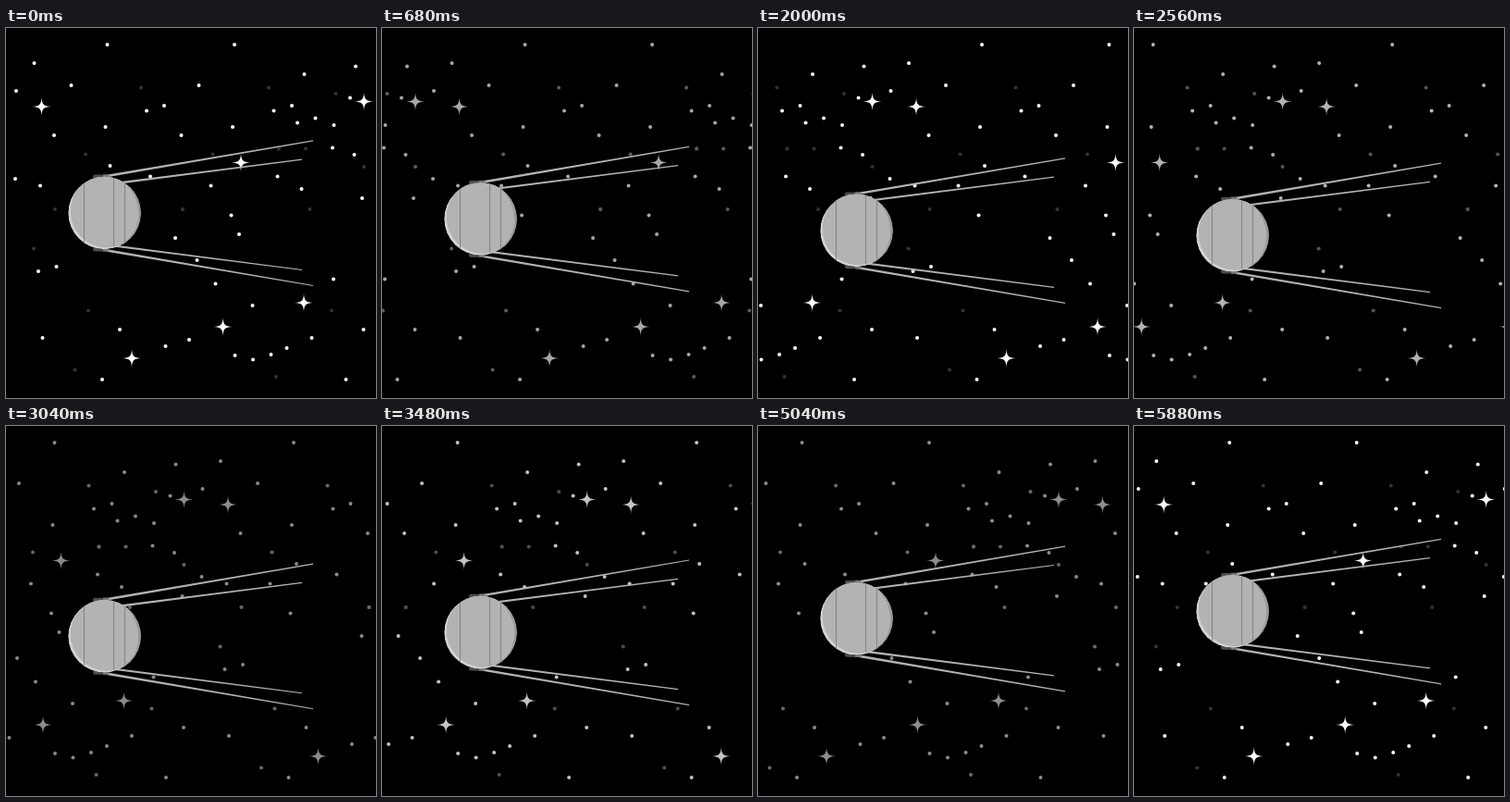
An HTML page for the animation above (5920 ms loop, 400 by 400 pixels).

```html
<!DOCTYPE html>
<html lang="en">
<head>
<meta charset="utf-8">
<title>Satellite</title>
<style>
html, body { margin: 0; width: 100%; height: 100%; overflow: hidden; background: #000; }
svg { display: block; width: 100%; height: 100%; }
</style>
</head>
<body>
<svg viewBox="0 0 400 400">
  <defs>
    <clipPath id="ball"><circle cx="106.5" cy="200" r="39.3"/></clipPath>
    <g id="tile"><g id="bright" fill="#fff"></g><g id="dim" fill="#fff"></g></g>
  </defs>
  <rect width="400" height="400"/>
  <g id="sky">
    <use href="#tile" x="-396"/>
    <use href="#tile"/>
    <use href="#tile" x="396"/>
  </g>
  <g id="craft">
    <g fill="#b3b3b3">
      <path d="M104 159.6L332 121.3V122.5L104 162.2Z"/>
      <path d="M116 167.1L320 141.6V142.8L116 169.4Z"/>
      <path d="M112 233.8L320 260.9V262.1L112 236.1Z"/>
      <path d="M104 238.3L332 277.9V279.1L104 240.9Z"/>
    </g>
    <g fill="#4d4d4d">
      <rect x="94" y="158.6" width="17" height="5" rx="2"/>
      <rect x="94" y="236.4" width="17" height="5" rx="2"/>
    </g>
    <g fill="#777">
      <rect x="105" y="158.4" width="6.5" height="3"/>
      <rect x="105" y="238.4" width="6.5" height="3"/>
    </g>
    <g clip-path="url(#ball)">
      <circle cx="106.5" cy="200" r="39.3" fill="#d2d2d2"/>
      <circle cx="109.3" cy="198" r="39.3" fill="#9b99a1"/>
      <path d="M109.3 158.7A39.3 39.3 0 0 0 109.3 237.3C130 237 143 220 143 201C143 180 129 162 109.3 158.7Z" fill="#b3b3b3"/>
      <path d="M84.5 167V233M116.5 162V236M128.5 167V233" stroke="#858585" stroke-width="1.1"/>
    </g>
  </g>
</svg>
<script>
const LOOP = 5920, STEP = 40, TILE = 396, SPEED = 0.06628;

// y followed by the x places on that row
const dots = [
  [18, 109.5, 247], [38, 30.5], [41.5, 378], [50, 322.5], [62, 70.5, 208.5],
  [68, 11], [75.5, 372], [84, 171, 309], [89.5, 152, 289.5], [97.5, 334.5],
  [102.5, 315], [105, 354.5], [107, 107.5, 245], [116, 52, 189.5], [129.5, 353],
  [137, 376.5], [149, 112.5], [160.5, 156, 293.5], [163, 10], [170.5, 37, 84, 221.5],
  [174, 319.5], [184, 385], [202.5, 106, 243.5], [223, 252], [227, 183],
  [251, 206.5], [258, 54.5], [263, 35], [271.5, 354], [276.5, 226.5],
  [300, 266.5], [326, 123, 386.5], [335, 39.5, 330.5], [337, 198], [344, 172.5],
  [346, 303.5], [353, 286.5], [354, 247.5], [358.5, 267], [380, 104, 367.5]
];
const faint = [
  [64.5, 146, 284], [71, 356.5], [130.5, 295, 324], [136.5, 86, 223.5], [150, 387],
  [196, 53, 191, 328.5], [238.5, 30], [305.5, 89, 352], [369.5, 74.5], [377, 292]
];
const sparks = [[79.5, 387], [85, 38.5], [145.5, 254], [297, 322], [323, 234.5], [357, 136]];

const $ = id => document.getElementById(id);
const sky = $("sky"), craft = $("craft"), bright = $("bright"), dim = $("dim");

function add(group, rows, d) {
  for (const [y, ...xs] of rows)
    for (const x of xs) {
      const p = document.createElementNS("http://www.w3.org/2000/svg", "path");
      p.setAttribute("d", d);
      p.setAttribute("transform", `translate(${x} ${y})`);
      group.append(p);
    }
}
const disc = "M-2 0A2 2 0 1 1 2 0A2 2 0 1 1-2 0Z";
add(bright, dots, disc);
add(bright, sparks, "M0-10C.4-2.2 2.2-.4 10 0C2.2.4.4 2.2 0 10C-.4 2.2-2.2.4-10 0C-2.2-.4-.4-2.2 0-10Z");
add(dim, faint, disc);
add(dim, [[130.5, 295], [196, 191]], "M-2.2 0A2.2 2.2 0 1 1 2.2 0A2.2 2.2 0 1 1-2.2 0Z");
for (const p of [...dim.children].slice(-2)) p.setAttribute("opacity", 0.5);

// 0 at the ends of each period, 1 in the middle
const wave = (t, period) => 1 - Math.abs(1 - 2 * (t % period) / period);

function draw(now) {
  const t = Math.floor(now % LOOP / STEP) * STEP;
  const fade = wave(t, LOOP / 3);
  sky.setAttribute("transform", `translate(${t * SPEED % TILE} 0)`);
  craft.setAttribute("transform", `translate(0 ${28 * wave(t, LOOP)})`);
  bright.setAttribute("opacity", 1 - 0.5 * fade);
  dim.setAttribute("opacity", 0.2 + 0.25 * fade);
}

const start = performance.now();
function tick() {
  draw(performance.now() - start);
  requestAnimationFrame(tick);
}
tick();
</script>
</body>
</html>
```
